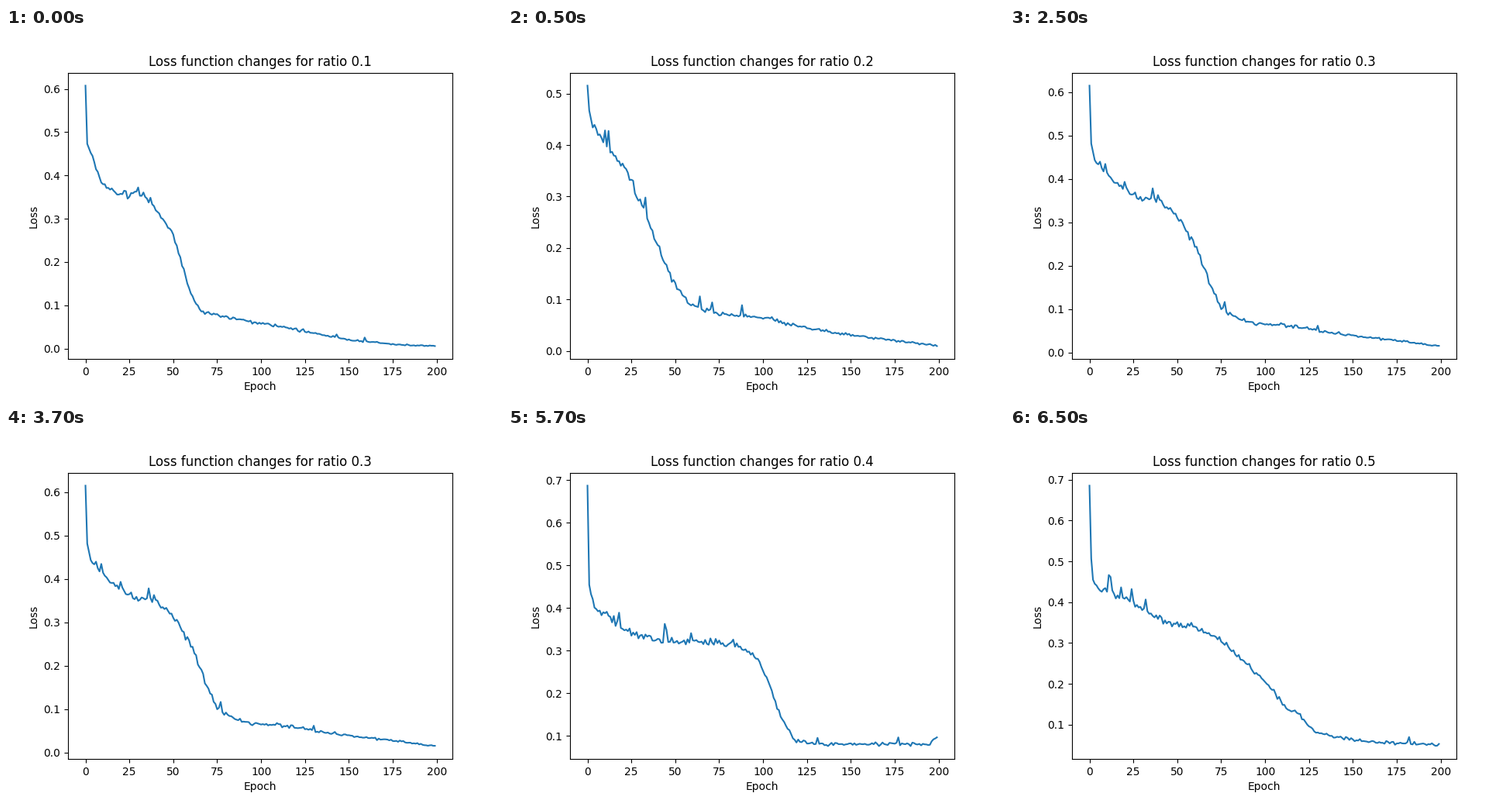
Recreate the animation shown at these times as a matplotlib script. Size 640 by 480 pixels, loop 8 s.

```python
import numpy as np
import matplotlib.pyplot as plt
from matplotlib.animation import FuncAnimation

EPOCHS = np.arange(200)
INTERVAL = 500  # ms
FRAMES = 16
NOISE = 0.008


def training_run(seed, low, trend, spikes):
    """Follow a trend through key points, with noise and a few sharp spikes."""
    points = list(trend)
    start = trend[0]
    noise = np.random.default_rng(seed).normal(size=EPOCHS.size)
    noise[:4] = 0
    loss = np.interp(EPOCHS, points, list(trend.values()))
    loss += NOISE * np.sqrt(loss) * noise
    for epoch, height in spikes.items():
        loss[epoch] += height
    margin = 0.05 * (start - low)
    return np.clip(loss, low, start), (low - margin, start + margin)


runs = [
    training_run(
        1, 0.0056,
        {0: 0.6074, 1: 0.473, 3: 0.452, 9: 0.382, 19: 0.357, 30: 0.362,
         40: 0.325, 50: 0.262, 60: 0.127, 66: 0.085, 90: 0.065, 115: 0.048,
         150: 0.020, 180: 0.008, 199: 0.006},
        {37: 0.02, 143: 0.007, 159: 0.009}),
    training_run(
        2, 0.0099,
        {0: 0.5152, 1: 0.467, 3: 0.434, 9: 0.408, 15: 0.380, 22: 0.352,
         30: 0.291, 40: 0.205, 48: 0.140, 57: 0.093, 75: 0.072, 100: 0.066,
         115: 0.052, 140: 0.036, 165: 0.025, 199: 0.0105},
        {10: 0.02, 12: 0.035, 33: 0.03, 64: 0.02, 71: 0.018, 88: 0.018}),
    training_run(
        3, 0.0145,
        {0: 0.6145, 1: 0.481, 3: 0.443, 9: 0.417, 18: 0.380, 28: 0.354,
         40: 0.350, 52: 0.303, 61: 0.243, 69: 0.155, 75: 0.102, 82: 0.082,
         95: 0.066, 118: 0.060, 130: 0.049, 160: 0.034, 199: 0.0145},
        {6: 0.02, 20: 0.018, 36: 0.04, 39: 0.02, 77: 0.02, 130: 0.01}),
    training_run(
        4, 0.07645,
        {0: 0.68745, 1: 0.455, 2: 0.433, 5: 0.398, 10: 0.387, 22: 0.348,
         42: 0.322, 80: 0.319, 90: 0.307, 98: 0.272, 104: 0.215, 110: 0.145,
         118: 0.090, 126: 0.081, 195: 0.081, 199: 0.097},
        {18: 0.03, 44: 0.045, 45: 0.03, 59: 0.02, 131: 0.012, 177: 0.014}),
    training_run(
        5, 0.0474,
        {0: 0.6853, 1: 0.507, 2: 0.455, 4: 0.435, 10: 0.424, 20: 0.412,
         43: 0.354, 60: 0.336, 75: 0.309, 85: 0.268, 100: 0.207, 112: 0.140,
         118: 0.130, 129: 0.080, 140: 0.069, 160: 0.058, 199: 0.050},
        {11: 0.05, 12: 0.045, 18: 0.025, 24: 0.028, 32: 0.025, 182: 0.012}),
]

fig, ax = plt.subplots(figsize=(6.4, 4.8), dpi=100)
line, = ax.plot(EPOCHS, runs[0][0])
ax.set_xlabel("Epoch")
ax.set_ylabel("Loss")


def update(frame):
    run = (frame + 3) // 4  # the first run shows for a single step
    loss, limits = runs[run]
    line.set_ydata(loss)
    ax.set_ylim(limits)
    ax.set_title(f"Loss function changes for ratio 0.{run + 1}")
    return line,


anim = FuncAnimation(fig, update, frames=FRAMES, interval=INTERVAL,
                     repeat=True, repeat_delay=0)
plt.show()
```
